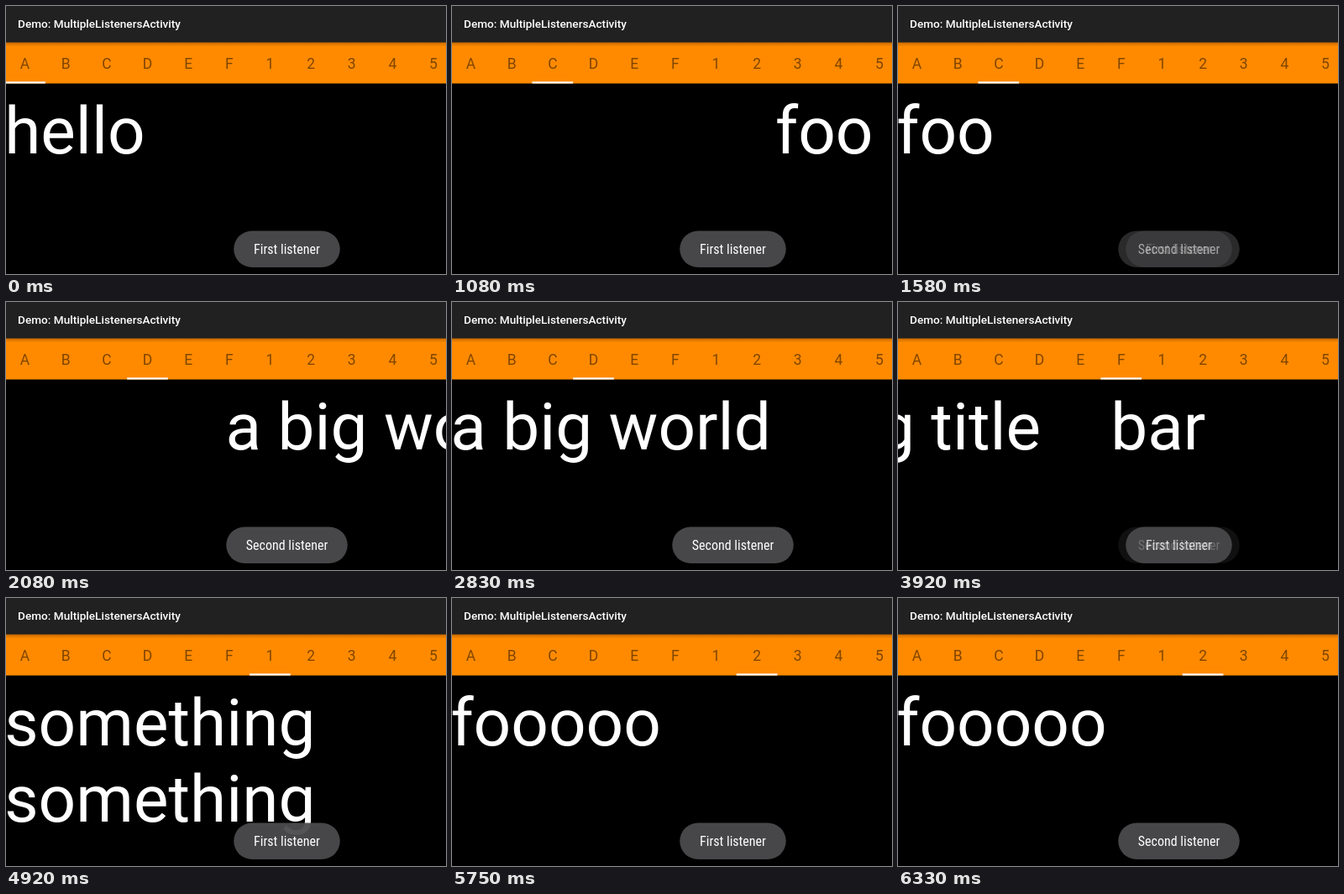
These frames come from a looping animation (524 px wide and 320 px high, 6.41 s). An HTML page:

```html
<!DOCTYPE html>
<html lang="en">
<head>
<meta charset="utf-8">
<title>Pager with toasts</title>
<style>
  html, body { margin: 0; width: 100%; height: 100%; overflow: hidden; background: #000; }
  svg { display: block; width: 524px; height: 320px; }
  text { font-family: Roboto, sans-serif; fill: #fff; }
  .title { font-size: 13.6px; font-weight: 500; }
  .tab { font-size: 17.5px; fill: #000; fill-opacity: .5; text-anchor: middle; }
  .page { font-size: 78.3px; }
  .toast rect { fill: #4b4b4d; fill-opacity: .95; }
  .toast text {
    font-family: "Roboto Condensed", Roboto, sans-serif;
    font-size: 16px; font-stretch: 75%; text-anchor: middle;
  }
</style>
</head>
<body>
<svg viewBox="0 0 524 320">
  <defs>
    <linearGradient id="shade" x2="0" y2="1">
      <stop offset="0" stop-opacity=".22"/>
      <stop offset="1" stop-opacity="0"/>
    </linearGradient>
  </defs>
  <rect width="524" height="320"/>
  <g id="pager"></g>
  <rect width="524" height="43.5" fill="#212121"/>
  <text class="title" x="14" y="25.5">Demo: MultipleListenersActivity</text>
  <rect y="43.5" width="524" height="49" fill="#ff8a00"/>
  <rect y="43.5" width="524" height="5" fill="url(#shade)"/>
  <g id="tabs"></g>
  <rect id="indicator" y="90.3" width="48.65" height="2.2" fill="#fff"/>
  <g id="toasts"></g>
</svg>
<script>
const LOOP = 6410, FRAME = 1000 / 12;
const LEFT = -1.8, PAGE_WIDTH = 671, TAB_WIDTH = 48.65;
const PAGES = ["hello", "world", "foo", "a big world", "another long title",
               "bar", "something\nsomething", "fooooo"];
const SWIPES = [380, 1033, 2003, 2985, 3834, 4550, 5470];
const SWIPE_TIME = 300;
const TOAST_SWITCHES = [1450, 3700, 5950];
const TOAST_FADE = 280;

const byId = id => document.getElementById(id);
const clamp = v => Math.min(1, Math.max(0, v));
const easeOut = u => 1 - (1 - u) ** 3;

function add(parent, tag, attrs, content = "") {
  const node = document.createElementNS("http://www.w3.org/2000/svg", tag);
  for (const key in attrs) node.setAttribute(key, attrs[key]);
  node.textContent = content;
  return parent.appendChild(node);
}

PAGES.forEach((page, i) => page.split("\n").forEach((line, row) =>
  add(byId("pager"), "text",
      { class: "page", x: LEFT + i * PAGE_WIDTH, y: 175.5 + row * 91.7 }, line)));

[..."ABCDEF12345"].forEach((label, i) =>
  add(byId("tabs"), "text", { class: "tab", x: LEFT + (i + .5) * TAB_WIDTH, y: 75.2 }, label));

function makeToast(label, width) {
  const toast = add(byId("toasts"), "g", { class: "toast" });
  add(toast, "rect", { x: 334.5 - width / 2, y: 268.5, width, height: 43.5, rx: 21.75 });
  add(toast, "text", { x: 334.5, y: 296.3 }, label);
  return toast;
}
const toasts = [makeToast("First listener", 126.5), makeToast("Second listener", 144.5)];

function render(ms) {
  const t = Math.floor((ms % LOOP + 4) / FRAME) * FRAME;

  let scroll = 0, selected = 0;
  for (const start of SWIPES) {
    scroll += easeOut(clamp((t - start) / SWIPE_TIME));
    if (t > start) selected++;
  }
  byId("pager").setAttribute("transform", `translate(${-scroll * PAGE_WIDTH} 0)`);
  byId("indicator").setAttribute("x", LEFT + selected * TAB_WIDTH);

  const shown = TOAST_SWITCHES.filter(start => t >= start).length;
  const fade = shown ? clamp((t - TOAST_SWITCHES[shown - 1]) / TOAST_FADE) : 1;
  const current = toasts[shown % 2], previous = toasts[(shown + 1) % 2];
  current.setAttribute("opacity", clamp(fade * 1.25));
  previous.setAttribute("opacity", 1 - fade);
}

const begin = performance.now();
function tick() {
  render(performance.now() - begin);
  requestAnimationFrame(tick);
}
tick();
</script>
</body>
</html>
```
